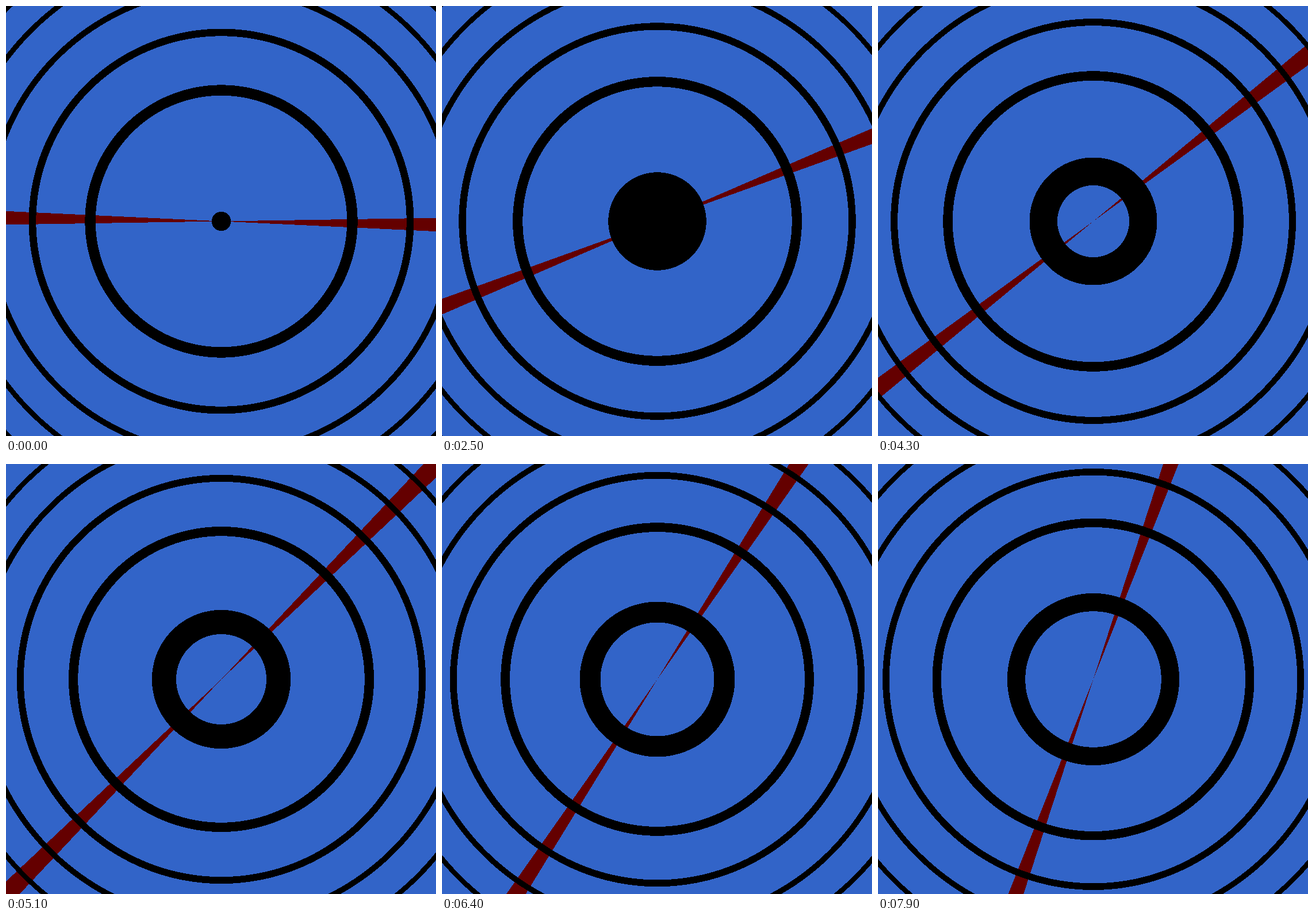
Recreate the animation shown at these times as an HTML page with a canvas. Size 748 by 748 pixels, loop 8000 ms.

```html
<!DOCTYPE html>
<html lang="en">
<head>
<meta charset="utf-8">
<title>Expanding rings and turning beam</title>
<style>
  html, body { margin: 0; width: 100%; height: 100%; overflow: hidden; background: #3264c8; }
  canvas { display: block; width: 748px; height: 748px; }
</style>
</head>
<body>
<canvas width="748" height="748"></canvas>
<script>
const SIZE = 748, HALF = SIZE / 2;
const STEP_MS = 100, STEPS = 80;
const CYCLE = 200;        // steps until rings and beam repeat
const RING = 30;          // ring thickness, in steps
const BEAM = 4;           // beam width, in steps
const RING_AREA = 0.4;    // squared radius between rings, in units of HALF²

const ctx = document.querySelector("canvas").getContext("2d");
const image = ctx.createImageData(SIZE, SIZE);
const pixels = new Uint32Array(image.data.buffer);
const ringPhase = new Float32Array(SIZE * SIZE);
const beamPhase = new Float32Array(SIZE * SIZE);

// Packed as ABGR
const BLUE = 0xffc86432, RED = 0xff000064, BLACK = 0xff000000;

const wrap = v => ((v % CYCLE) + CYCLE) % CYCLE;

for (let y = 0, i = 0; y < SIZE; y++) {
  for (let x = 0; x < SIZE; x++, i++) {
    const dx = (x - HALF) / HALF, dy = (HALF - y) / HALF;
    ringPhase[i] = wrap((dx * dx + dy * dy) / RING_AREA * CYCLE);
    beamPhase[i] = wrap(Math.atan2(dy, dx) / Math.PI * CYCLE);
  }
}

// True when phase lies within width steps behind the head
function trails(head, phase, width) {
  const lag = head - phase;
  return (lag < 0 ? lag + CYCLE : lag) < width;
}

function draw(step) {
  const head = step + 1;
  for (let i = 0; i < pixels.length; i++) {
    pixels[i] = trails(head, ringPhase[i], RING) ? BLACK
      : trails(head, beamPhase[i], BEAM) ? RED : BLUE;
  }
  ctx.putImageData(image, 0, 0);
}

const start = performance.now();
let shown = 0;
draw(0);

function tick() {
  const elapsed = performance.now() - start;
  const step = Math.floor(elapsed / STEP_MS) % STEPS;
  if (step !== shown) draw(shown = step);
  requestAnimationFrame(tick);
}
requestAnimationFrame(tick);
</script>
</body>
</html>
```
